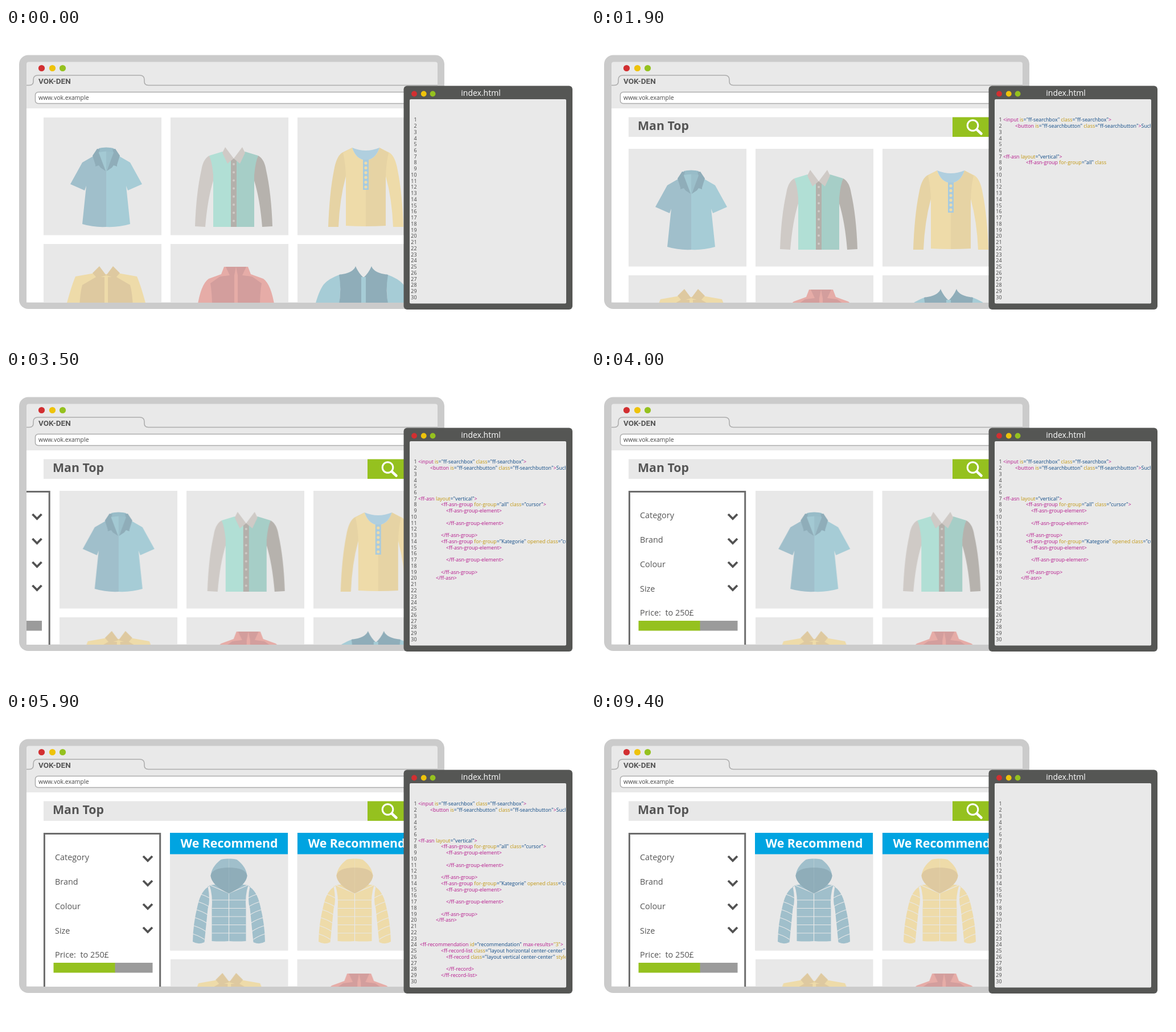
An HTML page that plays this animation: 1017x551 px, repeating every 9.5 s.

```html
<!DOCTYPE html>
<html lang="en">
<head>
<meta charset="utf-8">
<title>Shop builder</title>
<style>
html, body { margin: 0; width: 100%; height: 100%; overflow: hidden; background: #fff; }
svg { display: block; width: 100vw; height: 100vh; }
text { font-family: "Open Sans", sans-serif; white-space: pre; }
.mirror { transform: scaleX(-1); }
.bold { font-size: 21.3px; font-weight: 700; }
.labels { font-size: 14.4px; fill: #555; }
.code, .nums { font-size: 8.9px; }
.nums { fill: #444; text-anchor: end; }
.tag { fill: #b5178b; }
.attr { fill: #c1960f; }
.val { fill: #0f4a86; }

#cards, #tops, #bar, #side, #rec, #mark { animation: 9.5s step-end infinite; }
#cards { animation-name: cards; }
#tops { animation-name: tops; }
#bar { animation-name: bar; }
#side { animation-name: side; }
#rec { animation-name: rec; }
#mark { animation-name: mark; transform-origin: 0 475px; }

@keyframes cards {
  0% { transform: translate(0, 0); }
  9.4737% { transform: translate(0, 0); animation-timing-function: steps(5); }
  14.7368% { transform: translate(0, 55px); }
  36.8421% { transform: translate(28px, 55px); animation-timing-function: steps(5); }
  42.1053%, 100% { transform: translate(222.5px, 55px); }
}
/* the garments set off a little later than their cards */
@keyframes tops {
  0% { transform: translate(0, 0); }
  10.5263% { transform: translate(0, -11px); }
  11.5789% { transform: translate(0, -15px); }
  36.8421%, 100% { transform: translate(-6.3px, -15px); }
}
@keyframes bar {
  0% { transform: translateY(-55px); }
  9.4737% { transform: translateY(-55px); animation-timing-function: steps(5); }
  14.7368%, 100% { transform: translateY(0); }
}
@keyframes side {
  0% { transform: translateX(-240px); }
  35.7895% { transform: translateX(-233px); }
  36.8421% { transform: translateX(-194.5px); animation-timing-function: steps(5); }
  42.1053%, 100% { transform: translateX(0); }
}
@keyframes rec {
  0% { opacity: 0; }
  57.8947% { opacity: 0; animation-timing-function: steps(4); }
  62.1053%, 100% { opacity: 1; }
}
@keyframes mark {
  0% { opacity: 0; transform: scaleY(.239); }
  93.6842% { opacity: 1; transform: scaleY(.239); animation-timing-function: steps(3); }
  96.8421% { opacity: 1; transform: scaleY(1); }
  98.9474%, 100% { opacity: 0; transform: scaleY(1); }
}
</style>
</head>
<body>
<svg viewBox="0 0 1017 551" preserveAspectRatio="none">
  <defs>
    <clipPath id="page"><path d="M36 141H758V481.500H36Z"/></clipPath>
    <clipPath id="pane"><path d="M709 125H983V483H709Z"/></clipPath>
    <g id="dots">
      <circle r="5.6" fill="#d22f31"/>
      <circle cx="19" r="5.6" fill="#eec30b"/>
      <circle cx="37" r="5.6" fill="#95c11f"/>
    </g>
  </defs>

  <!-- browser -->
  <rect x="23" y="47.500" width="747" height="445.500" rx="16" fill="#cbcbcb"/>
  <rect x="36" y="59.500" width="722" height="422" rx="4" fill="#e9e9e9"/>
  <path d="M36 141H758V481.500H36Z" fill="#fff"/>
  <use href="#dots" x="62.500" y="70.500"/>
  <path d="M36 100.500H41Q48 100.500 48 94V91Q48 83 56 83H235Q243 83 243 91V94Q243 100.500 250 100.500H758" fill="none" stroke="#adadad" stroke-width="1.6"/>
  <text x="57" y="98" fill="#555" style="font:700 13.5px Roboto,sans-serif">VOK-DEN</text>
  <rect x="51.500" y="112.500" width="700" height="20" rx="5" fill="#fff" stroke="#adadad" stroke-width="1.5"/>
  <text x="57" y="126" font-size="10.500" fill="#444">www.vok.example</text>

  <g clip-path="url(#page)">
    <g id="cards"><g id="slots" fill="#e8e8e8"></g><g id="tops"></g></g>
    <g id="bar">
      <path d="M66 156.500H635V191H66Z" fill="#e8e8e8"/>
      <path d="M635 156.500H728V191H635Z" fill="#95c11f"/>
      <text class="bold" x="82" y="179" fill="#555">Man Top</text>
      <g fill="none" stroke="#fff" stroke-linecap="round">
        <circle cx="670.500" cy="171" r="9.300" stroke-width="3"/>
        <path d="M678.500 179L685.500 185.500" stroke-width="4.500"/>
      </g>
    </g>
    <g id="side">
      <path d="M67.400 500V213.500H270.700V500" fill="#fff" stroke="#6c6c6c" stroke-width="3"/>
      <g class="labels">
        <text x="86" y="260">Category</text>
        <text x="86" y="303">Brand</text>
        <text x="86" y="346">Colour</text>
        <text x="86" y="389">Size</text>
        <text x="86" y="431">Price:  to 250£</text>
      </g>
      <path d="M241 253l8 8 8-8M241 296l8 8 8-8M241 337l8 8 8-8M241 378l8 8 8-8" fill="none" stroke="#525252" stroke-width="3.800"/>
      <path d="M83.500 440H192V457.500H83.500Z" fill="#95c11f"/>
      <path d="M191.500 440H257.500V457.500H191.500Z" fill="#9b9b9b"/>
    </g>
    <g id="rec"></g>
  </g>

  <!-- editor -->
  <rect x="698.500" y="101.500" width="296.500" height="392.500" rx="6" fill="#555654"/>
  <rect x="709" y="125" width="275" height="358.500" rx="2" fill="#e9e9e9"/>
  <use href="#dots" transform="translate(717 115.500) scale(.88)"/>
  <text x="834" y="119" font-size="14" fill="#fff" text-anchor="middle">index.html</text>
  <g class="nums"></g>
  <g class="code" clip-path="url(#pane)"></g>
  <path id="mark" d="M724 157H983V475H724Z" fill="#000" fill-opacity=".58"/>
</svg>

<script>
const LOOP = 9500, STEP = 100;
const $ = s => document.querySelector(s);
const range = n => [...Array(n).keys()];
const at = (x, body) => `<g transform="translate(${x})">${body}</g>`;
const path = (d, fill) => `<path d="${d}" fill="${fill}"/>`;
// left half plus its mirror image about x = 0
const pair = (d, left, right = left) => path(d, left) + `<g class="mirror">${path(d, right)}</g>`;
const buttons = (n, y, gap, r, fill) =>
  range(n).map(i => `<circle cy="${y + i * gap}" r="${r}" fill="${fill}"/>`).join('');

const sky = '#a6ccd6', blue = '#a0bfcb', slate = '#8fadb9';
const sand = '#eedba9', wheat = '#e6d3a4', tan = '#dec9a0';
const rose = '#e6aca7', wine = '#d39e9d', stone = '#cfcac6', ash = '#b6b2ad';

const polo = pair('M0 212L-16 221L-42 236L-63 274L-38 285L-35 277L-42 344Q-22 350 0 349Z', blue, sky)
  + pair('M0 210Q-10 210 -16 213L-12 225L0 252Z', '#a3c9d3', '#9bbfca')
  + path('M-13 211Q0 208 13 211L12 218Q0 215 -12 218Z', '#98bcc8')
  + pair('M-16 212L-11 213L-13 219L-1 251L-10 245L-13 241L-19 243L-19 240L-24 224Z', slate);

const shirt = pair('M-43 224Q-54 230 -57 250Q-66 290 -68 348L-50 349Q-46 300 -36 268L-34 240Z', stone, ash)
  + pair('M-20 217L-43 224Q-38 235 -36 258V349H0V230Z', '#b1dfd5', '#a6cec7')
  + path('M-5 229H5V349H-5Z', '#b4b0ab')
  + buttons(8, 239, 14.2, 2, stone)
  + pair('M-15 209L-20 219L-11 238L0 229Z', stone);

const henley = pair('M-24 210L-42 219Q-52 226 -56 250Q-64 290 -66 349L-48 349Q-46 300 -35 260Z', wheat, sand)
  + pair('M-24 210L-40 219Q-35 240 -35 265V347Q-18 348 0 348V232Q-17 231 -24 210Z', sand, wheat)
  + pair('M-24 210Q-12 215 0 215V232Q-17 231 -24 210Z', '#b0cfdf')
  + path('M-5 231H5V284H-5Z', '#a9cbde')
  + buttons(6, 237, 8.4, 2.6, sand);

const coat = pair('M0 432L-20 430L-54 436Q-62 455 -71 490H0Z', sand)
  + pair('M-18 437L-42 451Q-46 465 -47 490H-3V437Z', tan)
  + pair('M-12 418L-24 430L-16 439L0 434Z', tan);

const fleece = pair('M0 419H-21L-26 432L-48 440Q-62 450 -68 490H0Z', rose)
  + pair('M0 419H-18L-11 434L-28 436L-45 448Q-42 465 -42 490H-3V434Z', wine)
  + path('M-3 446H3V490H-3Z', rose);

const raglan = pair('M-40 432Q-62 440 -70 450Q-79 462 -86 490H-42Z', sky)
  + pair('M-14 418Q-18 430 -43 433Q-38 460 -44 490H0V438Q-9 430 -14 418Z', slate)
  + path('M-4 437H4V490H-4Z', sky);

// quilted jacket: seams are strokes in the card colour
function jacket(main, dark) {
  const rows = range(5).map(i => `M-30 ${330 + i * 14.5}H30`).join('');
  const arm = range(6).map(i => {
    const y = 320 + i * 14, x = -50 - i * 2.6;
    return `M${x - 6} ${y - 2}Q${x + 8} ${y + 1} ${x + 20} ${y + 9}`;
  }).join('');
  const seams = d => `<path d="${d}" fill="none" stroke="#e8e8e8" stroke-width="1.2"/>`;
  return pair('M-33 305Q-49 312 -55 340Q-63 372 -63.500 403Q-54 409 -43 404L-37 345Q-32 330 -37 306Z', main)
    + seams(arm) + `<g class="mirror">${seams(arm)}</g>`
    + pair('M-34 304Q-28 322 -30 345V402Q-15 403 0 402V300Z', main)
    + seams(rows + 'M0 318V403M-33 304L0 318L33 304')
    + pair('M0 257.500Q-9 257 -14 259Q-31 272 -32 288Q-28 305 0 318Z', main)
    + pair('M0 273Q-29 273 -32 287Q-31 304 0 318.500Z', dark);
}

$('#slots').innerHTML = range(6).map(i =>
  `<rect x="${66 + i % 3 * 223}" y="${i < 3 ? 157 : 379}" width="207" height="206.500"/>`).join('');
$('#tops').innerHTML = at(176, polo) + at(400, shirt) + at(632, henley)
  + at(176, coat) + at(404, fleece) + at(628, raglan);
$('#rec').innerHTML = [[288, blue, slate], [512, sand, tan]].map(([x, main, dark], i) =>
  path(`M${x} 249H${x + 207}V418.500H${x}Z`, '#e8e8e8')
  + path(`M${x} 212H${x + 207}V249.500H${x}Z`, '#00a4e1')
  + `<text class="bold" x="${x + 18.5}" y="238" fill="#fff">We Recommend</text>`
  + at(391.5 + i * 221, jacket(main, dark))).join('');

// editor lines: number, left edge, typing start and end, pieces
const group = '<ff-asn-group', item = '<ff-asn-group-element|>';
const itemEnd = '</ff-asn-group-element>', groupEnd = '</ff-asn-group>';
const lines = [
  [1, 724, 0, 450, '<input| is|="ff-searchbox"| class|="ff-searchbox"|>'],
  [2, 745, 450, 1000, '<button| is|="ff-searchbutton"| class|="ff-searchbutton"|>|Suche'],
  [7, 724, 1290, 1550, '<ff-asn| layout|="vertical"|>'],
  [8, 764, 1550, 2000, group + '| for-group|="all"| class|="cursor"|>'],
  [9, 773, 2000, 2140, item],
  [11, 773, 2140, 2280, itemEnd],
  [13, 764, 2280, 2370, groupEnd],
  [14, 764, 2370, 2680, group + '| for-group|="Kategorie"| opened class|="cur'],
  [15, 773, 2680, 2810, item],
  [17, 773, 2810, 2950, itemEnd],
  [19, 764, 2950, 3100, groupEnd],
  [20, 755, 3100, 3200, '</ff-asn>'],
  [24, 727, 4000, 4380, '<ff-recommendation| id|="recommendation"| max-results=|"3"|>'],
  [25, 764, 4380, 4750, '<ff-record-list| class|="layout horizontal center-center"'],
  [26, 773, 4750, 5130, '<ff-record| class|="layout vertical center-center"| style'],
  [28, 773, 5130, 5250, '</ff-record>'],
  [29, 764, 5250, 5400, '</ff-record-list>'],
];
const lineY = n => 164.3 + (n - 1) * 10.74;
const kind = s => /^[<>]|[^=]=$/.test(s) ? 'tag' : /^[=S]/.test(s) ? 'val' : 'attr';
const escape = s => s.replace(/</g, '&lt;').replace(/>/g, '&gt;');

$('.nums').innerHTML = range(30).map(i => `<text x="721.500" y="${lineY(i + 1)}">${i + 1}</text>`).join('');
$('.code').innerHTML = lines.map(([n, x, , , code]) => `<text x="${x}" y="${lineY(n)}">`
  + code.split('|').map(s => `<tspan class="${kind(s)}">${escape(s)}</tspan>`).join('') + '</text>').join('');

const typed = [...$('.code').children].map((el, i) => ({
  start: lines[i][2], end: lines[i][3], size: el.textContent.length,
  parts: [...el.children].map(node => ({ node, text: node.textContent })),
}));

function type(time) {
  for (const { start, end, size, parts } of typed) {
    const done = time >= 9400 ? 0 : Math.min(1, Math.max(0, (time - start) / (end - start)));
    let left = Math.round(done * size);
    for (const { node, text } of parts) {
      node.textContent = text.slice(0, left);
      left = Math.max(0, left - text.length);
    }
  }
}

let begin, shown = 0;
function tick(now) {
  begin ??= now;
  const time = Math.floor((now - begin) % LOOP / STEP) * STEP;
  if (time !== shown) type(shown = time);
  requestAnimationFrame(tick);
}
type(0);
requestAnimationFrame(tick);
</script>
</body>
</html>
```
